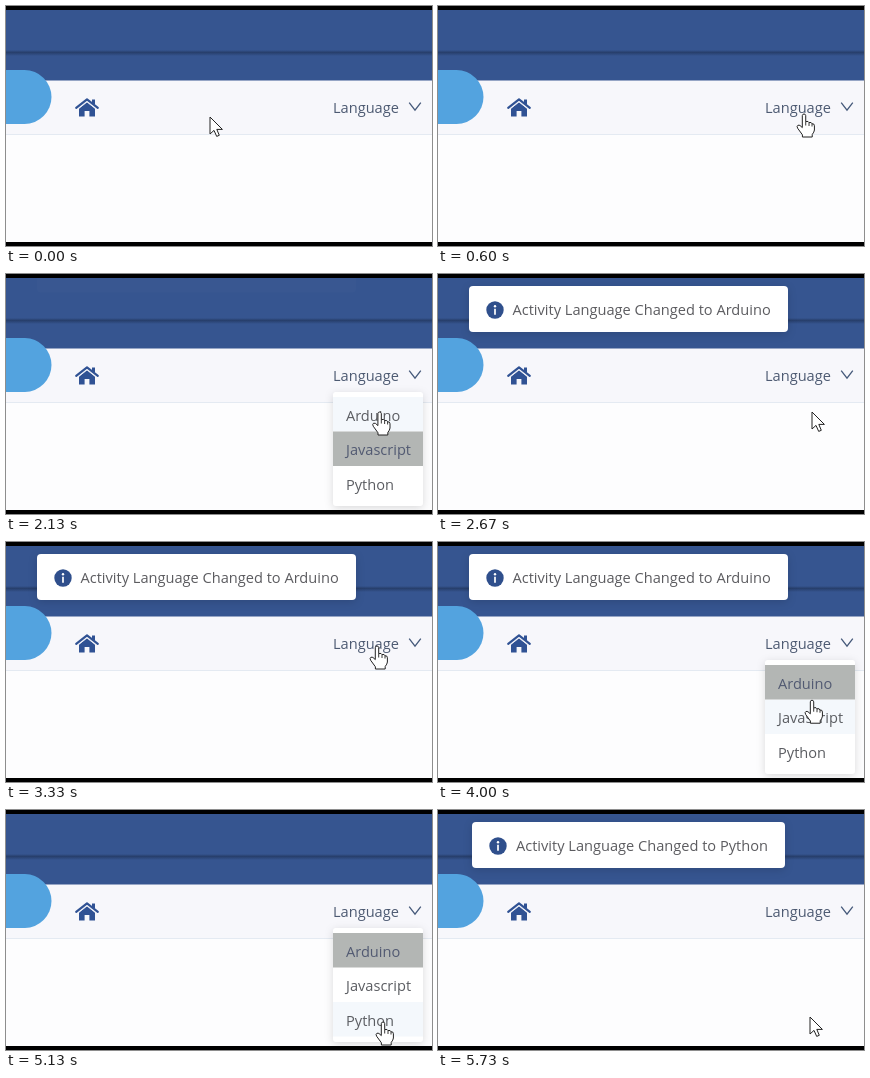
Write an HTML page that moves like this. It is 426 by 240 pixels and loops after 5.79 s.

```html
<!DOCTYPE html>
<html lang="en">
<head>
<meta charset="utf-8">
<title>Language menu</title>
<style>
  html, body { margin: 0; width: 100%; height: 100%; overflow: hidden; background: #000; }
  svg { display: block; width: 100vw; height: 100vh; }
  text { font-family: "Open Sans", "Noto Sans", sans-serif; font-size: 14.6px; fill: #4d5a72; }
  #menu text { fill: #5b5d62; }
  #menu text.chosen { fill: #525a72; }
  .card { fill: #fff; filter: drop-shadow(0 2px 4px rgba(0, 0, 0, .14)); }
  .toast text { fill: #5c5c60; }
</style>
</head>
<body>
<svg viewBox="0 0 426 240">
  <defs>
    <clipPath id="screen"><rect y="4" width="426" height="232"/></clipPath>
    <linearGradient id="crease" x2="0" y2="1">
      <stop offset="0" stop-color="#22375f" stop-opacity="0"/>
      <stop offset=".4" stop-color="#22375f" stop-opacity=".75"/>
      <stop offset="1" stop-color="#22375f" stop-opacity="0"/>
    </linearGradient>
    <g id="info">
      <circle r="8.7" fill="#2f4f8c"/>
      <circle cy="-3.7" r="1.2" fill="#fff"/>
      <path d="M0-1.2V4.8" stroke="#fff" stroke-width="1.7"/>
    </g>
  </defs>
  <rect width="426" height="240"/>
  <g clip-path="url(#screen)">
    <rect y="4" width="426" height="232" fill="#fdfdfe"/>
    <rect y="74" width="426" height="54.5" fill="#f7f7fb"/>
    <rect y="4" width="426" height="70.5" fill="#365590"/>
    <rect y="44" width="426" height="6" fill="url(#crease)"/>
    <rect y="128" width="426" height="1" fill="#e4eaf2"/>
    <rect x="-40" y="64" width="85.5" height="54" rx="27" fill="#53a3df"/>
    <g fill="#305294">
      <path d="M73 102.5L81 96L89 102.5V110.5H83.4V105H78.6V110.5H73Z"/>
      <path d="M86 93.5H89V98H86Z"/>
      <path d="M70.2 101.8L81 93.4L91.8 101.8" fill="none" stroke="#305294" stroke-width="2.2" stroke-linecap="round" stroke-linejoin="round"/>
      <path d="M71.7 103.3L81 96L90.3 103.3" fill="none" stroke="#f7f7fb" stroke-width=".8"/>
    </g>
    <text x="327" y="107">Language</text>
    <path d="M403.2 96.6L409 104.2L414.8 96.6" fill="none" stroke="#45597a" stroke-width="1.3"/>

    <g id="menu">
      <rect class="card" x="327" y="118" width="90" height="114" rx="3"/>
      <rect id="hover" x="327" width="90" height="34.5" fill="#f4f8fc"/>
      <rect id="chosen" x="327" width="90" height="34.5" fill="#b3b6b4"/>
      <text x="340" y="147">Arduino</text>
      <text x="340" y="181">Javascript</text>
      <text x="340" y="216">Python</text>
    </g>

    <g class="toast">
      <rect class="card" x="31" y="12" width="319" height="46" rx="4"/>
      <use href="#info" x="57" y="36"/>
      <text x="74.5" y="41">Activity Language Changed to Arduino</text>
    </g>
    <g class="toast">
      <rect class="card" x="34" y="12" width="313" height="46" rx="4"/>
      <use href="#info" x="60" y="36"/>
      <text x="78" y="41">Activity Language Changed to Python</text>
    </g>

    <g id="cursor" fill="#fff" stroke="#222" stroke-width="1" stroke-linejoin="round">
      <path id="arrow" d="M0 0V17L4 13.4L6.7 19.4L9.3 18.3L6.8 12.4H12.4Z"/>
      <g id="hand">
        <path d="M-1.7 1.6Q-1.5 0 0 0T1.7 1.6V7.6Q4.6 6.8 5 8.6Q7.6 7.8 8 9.8Q10.4 9.4 10.4 11.8V16Q10.2 18 8.2 20.5V23H-1.6V20.8L-6.4 14.2Q-7.6 12 -6 11.2T-1.7 13.6Z"/>
        <path d="M1.7 7.6V11.5M5 8.6V12M8 9.8V12.5" fill="none" stroke-width=".9"/>
      </g>
    </g>
  </g>
</svg>
<script>
const LOOP = 5790;
const $ = id => document.getElementById(id);
const toasts = document.querySelectorAll(".toast");
const items = document.querySelectorAll("#menu text");

// time, x, y of the pointer tip
const route = [
  [0, 204, 111], [70, 204, 111], [570, 366, 108], [950, 367, 108],
  [1400, 373, 138], [2670, 374, 138], [2820, 374, 138], [3200, 371, 104],
  [3650, 371, 104], [4350, 377, 212], [5250, 377, 212], [5550, 372, 207], [LOOP, 372, 207]
];
const menuTimes = [[780, 2130], [3480, 5150]];
const toastTimes = [[2130, 4130], [5150, 9000]];

const clamp = v => Math.min(1, Math.max(0, v));
const ease = v => v * v * (3 - 2 * v);
const out = v => 1 - (1 - v) ** 3;

// 0..1 visibility for a span that fades at both ends
const shown = (t, [start, end], fade) =>
  out(clamp((t - start) / fade)) * (1 - ease(clamp((t - end) / fade)));

function pointer(t) {
  const i = route.findIndex((p, n) => n && t <= p[0]);
  const [t0, x0, y0] = route[i - 1], [t1, x1, y1] = route[i];
  const k = ease((t - t0) / (t1 - t0));
  return [x0 + (x1 - x0) * k, y0 + (y1 - y0) * k];
}

const ROW = 34.5;
const rowTop = n => 123 + n * ROW;

function draw(t) {
  const [x, y] = pointer(t);
  const open = Math.max(...menuTimes.map(s => shown(t, s, 180)));
  const onLabel = x > 327 && y > 90 && y < 118;
  const row = Math.floor((y - rowTop(0)) / ROW);
  const onItem = open > .5 && row >= 0;
  const link = onLabel || onItem;
  const chosen = t < 2400 ? 1 : 0;

  $("cursor").setAttribute("transform", `translate(${x} ${y})`);
  $("hand").style.display = link ? "" : "none";
  $("arrow").style.display = link ? "none" : "";

  const scale = .8 + .2 * open;
  $("menu").setAttribute("opacity", open);
  $("menu").setAttribute("transform", `translate(0 ${118 * (1 - scale)}) scale(1 ${scale})`);
  $("hover").setAttribute("y", rowTop(Math.max(0, row)));
  $("hover").style.display = onItem ? "" : "none";
  $("chosen").setAttribute("y", rowTop(chosen));
  items.forEach((item, i) => item.classList.toggle("chosen", i === chosen));

  toasts.forEach((toast, i) => {
    const v = shown(t, toastTimes[i], 280);
    toast.setAttribute("opacity", v);
    toast.setAttribute("transform", `translate(0 ${-40 * (1 - v)})`);
  });
}

const begin = performance.now();
function tick() {
  draw((performance.now() - begin) % LOOP);
  requestAnimationFrame(tick);
}
tick();
</script>
</body>
</html>
```
